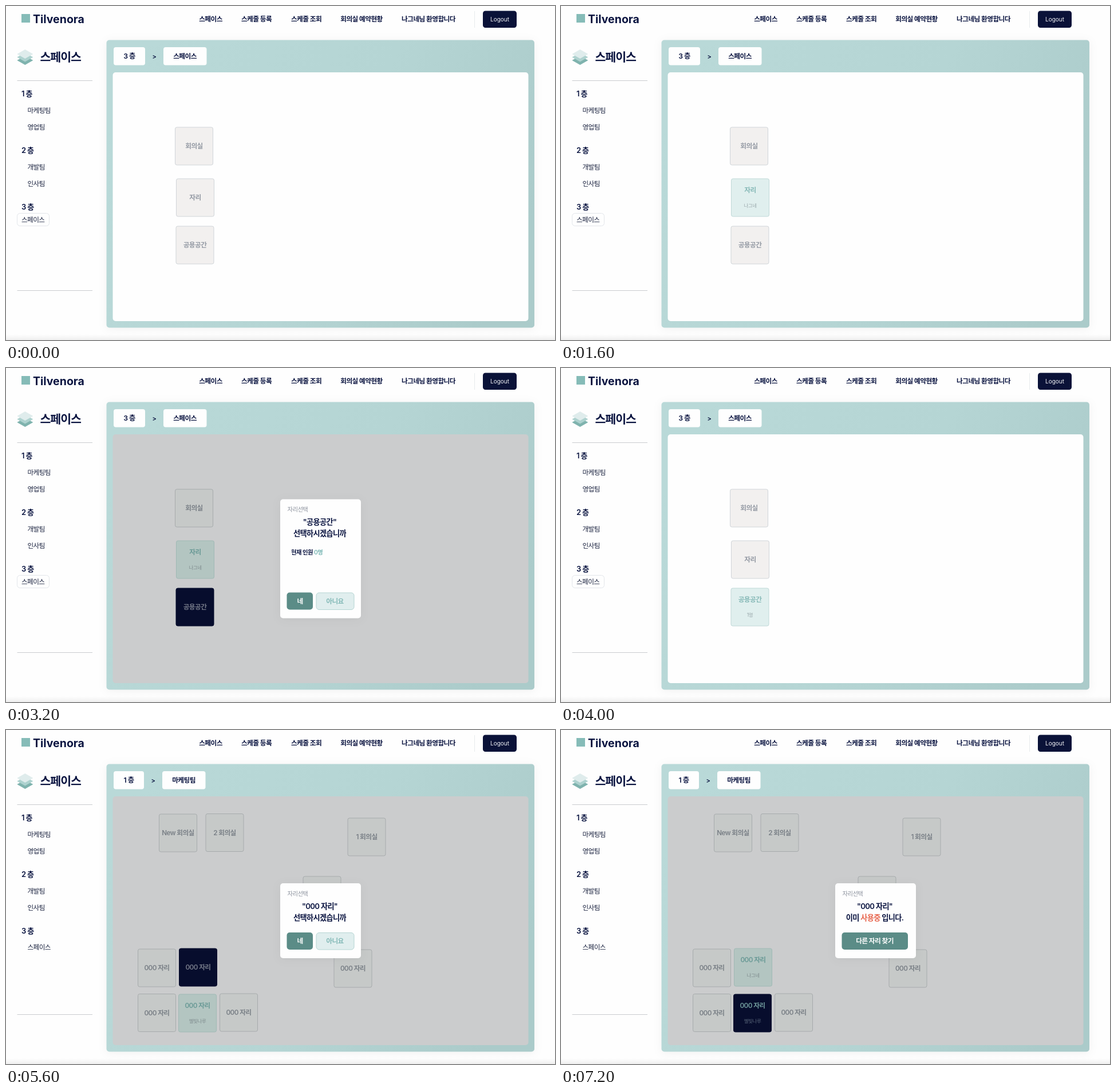
These frames come from a looping animation (959 by 584 pixels, 8000 ms). An HTML page:

```html
<!DOCTYPE html>
<html lang="ko">
<head>
<meta charset="utf-8">
<title>Seat booking</title>
<style>
  html, body { margin: 0; width: 100%; height: 100%; overflow: hidden; background: #fefefe; }
  svg { display: block; width: 100%; height: 100%; }
  text { font-family: Inter, "Noto Sans CJK KR", "Noto Sans CJK", sans-serif; letter-spacing: -.05em; }
  .latin { letter-spacing: 0; }
</style>
</head>
<body>
<svg id="stage" viewBox="0 0 959 584">
  <defs>
    <linearGradient id="panel" x1="0" y1="0.3" x2="1" y2="0.6">
      <stop offset="0" stop-color="#b9d9d8"/>
      <stop offset=".55" stop-color="#b5d5d4"/>
      <stop offset="1" stop-color="#abcbca"/>
    </linearGradient>
    <linearGradient id="foot" x1="0" y1="0" x2="0" y2="1">
      <stop offset="0" stop-color="#fefefe"/>
      <stop offset="1" stop-color="#efefef"/>
    </linearGradient>
    <filter id="soft" x="-20%" y="-20%" width="140%" height="140%">
      <feDropShadow dx="0" dy="2" stdDeviation="8" flood-color="#000" flood-opacity=".05"/>
    </filter>
  </defs>
  <g id="frame"></g>
  <g id="view"></g>
</svg>
<script>
const NAVY = '#0a1440', TEAL = '#79b6b4', DEEP = '#5b8c87', STEP = 800;

const rect = (x, y, w, h, r, fill, extra = '') =>
  `<rect x="${x}" y="${y}" width="${w}" height="${h}" rx="${r}" fill="${fill}" ${extra}/>`;
const text = (s, x, y, size, fill = NAVY, weight = 600, anchor = 'middle', cls = '') =>
  `<text x="${x}" y="${y}" font-size="${size}" fill="${fill}" font-weight="${weight}" text-anchor="${anchor}" class="${cls}">${s}</text>`;
const left = (s, x, y, size, fill, weight) => text(s, x, y, size, fill, weight, 'start');
const line = (x1, y1, x2, y2, color) =>
  `<path d="M${x1} ${y1}L${x2} ${y2}" stroke="${color}"/>`;
const rhomb = (cy, fill) => `<path d="M33.3 ${cy - 8}l14 8l-14 8l-14-8z" fill="${fill}"/>`;

function drawFrame() {
  const nav = [['스페이스', 357.5], ['스케줄 등록', 437.5], ['스케줄 조회', 524.5],
    ['회의실 예약현황', 621], ['나그네님 환영합니다', 738]];
  const floors = [[1, 157.5, '마케팅팀', '영업팀'], [2, 256.5, '개발팀', '인사팀'], [3, 355.5]];
  return rect(0, 574, 959, 10, 0, 'url(#foot)')
    + rect(27, 14, 15, 15, 0, '#86bcb8')
    + text('Tilvenora', 47, 29.5, 19.5, NAVY, 700, 'start', 'latin')
    + nav.map(([s, x]) => text(s, x, 27, 11.7)).join('')
    + line(818.5, 9, 818.5, 38, '#e8eaed')
    + rect(833, 8.5, 59, 29.5, 4.5, '#0a1238')
    + text('Logout', 862.5, 26.5, 10, '#f4f5f8', 400, 'middle', 'latin')
    + rhomb(95, '#7fb3ae') + rhomb(89.5, '#aed2cf') + rhomb(84, '#dfecec')
    + left('스페이스', 59.5, 96.5, 20.5)
    + line(19.5, 130.5, 151, 130.5, '#c9cccf') + line(19.5, 497.5, 151, 497.5, '#c9cccf')
    + floors.map(([n, y, ...teams]) => left(n + ' 층', 27, y, 13)
      + teams.map((s, i) => left(s, 37.5, y + 29.5 + i * 28.5, 11.6, '#1c2440', 400)).join('')).join('')
    + rect(175.5, 59.5, 747.5, 503, 5, 'url(#panel)', 'filter="url(#soft)"');
}

// Tile looks: fill, border, name, note
const LOOK = {
  free: ['#f2f0ef', '#d0d5d9', '#949aa4', '#a5abb1'],
  used: ['#e0efee', '#c0d9d8', '#86b9b7', '#9aa8ac'],
  freeDim: ['#c6c9c8', '#a7abad', '#7a8087'],
  usedDim: ['#b3c5c1', '#a0b9b5', '#6a9a96', '#7f8c8e'],
  pick: ['#070d2d', '#070d2d', '#747988', '#59667a']
};

function tile([x, y, name, note], look) {
  const [fill, edge, ink, small] = LOOK[look];
  const cx = x + 33;
  return rect(x, y, 66, 66, 3, fill, `stroke="${edge}"`)
    + text(name, cx, y + (note ? 24 : 37), 11.7, look === 'pick' && note ? '#6f9a9c' : ink)
    + (note ? text(note, cx, y + 50, 8.5, small, 400) : '');
}

const FLOORS = {
  3: { room: '스페이스', tiles: [[295.5, 212, '회의실'], [297.5, 302, '자리'], [297, 385, '공용공간']] },
  1: { room: '마케팅팀', tiles: [
    [267.5, 147, 'New 회의실'], [349, 146.5, '2 회의실'], [597, 154, '1 회의실'],
    [519, 256, '000 자리'], [573, 384, '000 자리'], [230.5, 383, '000 자리'],
    [302.5, 382, '000 자리'], [230.5, 461.5, '000 자리'], [301.5, 462, '000 자리'], [373.5, 461, '000 자리']
  ] }
};

// notes: tile index -> occupant; pick: tile in the dialog
const SCENES = [
  { floor: 3 },
  { floor: 3, pick: 1 },
  { floor: 3, notes: { 1: '나그네' } },
  { floor: 3, notes: { 1: '나그네' }, pick: 2, count: '0명' },
  { floor: 3, notes: { 1: '나그네' }, pick: 2, count: '0명', hover: true },
  { floor: 3, notes: { 2: '1명' } },
  { floor: 1, notes: { 8: '별빛나루' } },
  { floor: 1, notes: { 8: '별빛나루' }, pick: 6, hover: true },
  { floor: 1, notes: { 6: '나그네', 8: '별빛나루' }, pick: 8, taken: true },
  { floor: 1, notes: { 6: '나그네', 8: '별빛나루' }, pick: 8, taken: true, hover: true }
];

function dialog(name, { count, taken, hover }) {
  const h = count ? 208 : 131, y = count ? 229.5 : 268;
  const by = y + h - 45, main = hover ? DEEP : TEAL;
  const ask = taken ? '이미 <tspan fill="#e8674f">사용중</tspan> 입니다.' : '선택하시겠습니까';
  const buttons = taken
    ? rect(490.5, by, 115.5, 30, 5, main) + text('다른 자리 찾기', 548, by + 19, 11.7, '#fff')
    : rect(490.5, by, 45.5, 30, 5, main) + text('네', 513.5, by + 19, 11.7, '#fff')
      + rect(542, by + .5, 66, 29.5, 5, '#e0eeee', 'stroke="#b5d5d3"')
      + text('아니요', 574.5, by + 19, 11.7, '#83b9b7');
  return rect(479, y, 141, h, 5, '#fefefe', 'filter="url(#soft)"')
    + left('자리선택', 491.5, y + 21.5, 10.3, '#8a909c', 500)
    + text(`"${name}"`, 548, y + 44.5, 13.2)
    + text(ask, 548, y + 64.5, 13.2)
    + (count ? left(`현재 인원 <tspan fill="${TEAL}">${count}</tspan>`, 498, y + 96, 10.3) : '')
    + buttons;
}

function drawView(s) {
  const { room, tiles } = FLOORS[s.floor];
  const open = s.pick !== undefined, notes = s.notes || {};
  const shift = s.floor === 3 ? 0 : -2;
  const side = s.floor === 3
    ? rect(19.5, 362.5, 56, 22, 5, '#fefefe', 'stroke="#e3e6ea"') + left('스페이스', 27, 377.5, 11.6, '#1c2440', 400)
    : left('스페이스', 37.5, 384, 11.6, '#1c2440', 400);
  const crumbs = rect(188, 72, 55 + shift, 31.5, 4, '#fefefe')
    + text(s.floor + ' 층', 215.5 + shift / 2, 92, 12.3)
    + text('&gt;', 259 + shift, 92, 11)
    + rect(275 + shift, 72, 75.5, 31.5, 4, '#fefefe')
    + text(room, 312.5 + shift, 92, 11.7);
  const seats = tiles.map(([x, y, name], i) => {
    const look = i === s.pick ? 'pick' : (notes[i] ? 'used' : 'free') + (open ? 'Dim' : '');
    return tile([x, y, name, notes[i]], look);
  }).join('');
  return side + crumbs
    + rect(186.5, 116, 726, 435, 5, open ? '#cbcccd' : '#fefefe')
    + seats
    + (open ? dialog(tiles[s.pick][2], s) : '');
}

const view = document.getElementById('view');
let shown = -1;

function update(ms) {
  const i = Math.floor(ms / STEP) % SCENES.length;
  if (i !== shown) view.innerHTML = drawView(SCENES[shown = i]);
}

document.getElementById('frame').innerHTML = drawFrame();
update(0);
const start = performance.now();
(function tick() {
  update(performance.now() - start);
  requestAnimationFrame(tick);
})();
</script>
</body>
</html>
```
